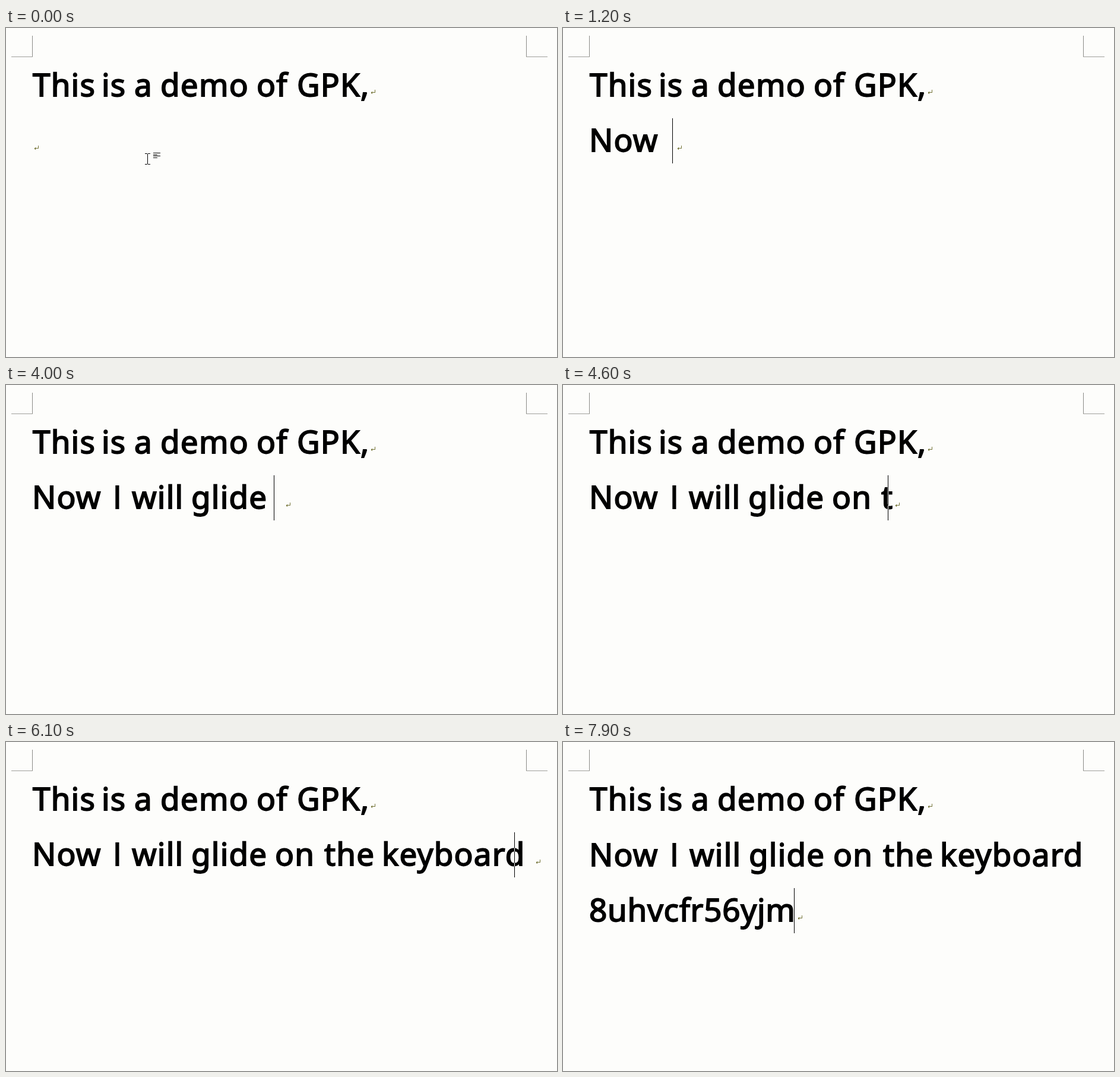
These frames come from a looping animation (928 px wide and 554 px high, 8 s). An HTML page:

```html
<!DOCTYPE html>
<html lang="en">
<head>
<meta charset="utf-8">
<title>Typing demo</title>
<style>
  html, body { margin: 0; width: 100%; height: 100%; overflow: hidden; background: #fdfdfb; }
  svg { display: block; width: 100%; height: 100%; background: #fdfdfb; }
  text {
    font: 400 53px "Noto Sans", sans-serif; letter-spacing: 1.2px; white-space: pre;
    fill: #000; stroke: #000; stroke-width: 1.8px;
  }
  .plain { font-family: "Open Sans", sans-serif; }
  .tight { letter-spacing: .7px; }
  path { fill: none; shape-rendering: crispEdges; }
  #caret { fill: #fdfdfb; mix-blend-mode: difference; }
</style>
</head>
<body>
<svg viewBox="0 0 928 554">
  <defs>
    <path id="mark" stroke="#77773c" d="M7.5 0V4.5H1M1.5 3.5V6M2.5 3V7"/>
  </defs>
  <path stroke="#8c8c88" d="M44.5 13V48M876.5 13V48"/>
  <path stroke="#a0a09c" d="M9 48.5H45M876 48.5H912"/>
  <g id="title"></g>
  <use href="#mark" x="614" y="104"/>
  <g id="typed"></g>
  <use id="endMark" href="#mark"/>
  <path id="pointer" stroke="#000" d="M234 211.5H238M239 211.5H243M238.5 212V229M234 229.5H238M239 229.5H243
    M248 210.5H260M248 213.5H255M248 215.5H260M248 218.5H255"/>
  <rect id="caret" width="1" height="76"/>
</svg>
<script>
const LOOP = 8000, STEP = 100, GLIDE = 75;
const LEFT = 44, SPACE = 14, SPACING = 1.2, TIGHT = 0.7;
const TITLE_X = [45, 161, 216, 260, 422, 490];
const LOOSE_X = [44, 180, 212, 312, 453, 536, 633];
const JUSTIFIED_X = [44, 180, 213, 313, 455, 539, 635];

// Each burst: start time, time between keys, keys ("<" is backspace).
const BURSTS = [
  [400, 200, "Now"], [1000, 100, "  "], [1500, 0, "<"], [1760, 40, "I  "],
  [2500, 30, "<wi"], [2850, 50, "ll"], [3260, 100, "  "],
  [3520, 50, "<glide"], [3800, 200, "  "], [4110, 70, "<on  "],
  [4460, 80, "<the  "], [4900, 100, "<ke"], [5300, 150, "yboard"], [6100, 50, "  "],
  [7000, 0, "8"], [7250, 40, "uhvcfr56yjm"]
];

const $ = id => document.getElementById(id);
const pen = document.createElement("canvas").getContext("2d");

function wordWidth(word, spacing) {
  pen.font = `400 53px ${word === "I" ? '"Open Sans"' : '"Noto Sans"'}, sans-serif`;
  return pen.measureText(word).width + spacing * word.length;
}

function wordsSvg(line, xs, y) {
  return line.split(" ").filter(Boolean).map((word, i) =>
    `<text x="${xs[i]}" y="${y}"${word === "I" ? ' class="plain"' : ""}>${word}</text>`).join("");
}

// Markup of the typed text and the position where it ends.
function layout(text) {
  const wrap = text.indexOf("8");
  if (wrap >= 0) {
    const tail = text.slice(wrap);
    return {
      svg: wordsSvg(text.slice(0, wrap), JUSTIFIED_X, 209) +
        `<text class="tight" x="${LEFT}" y="302">${tail}</text>`,
      x: LEFT + wordWidth(tail, TIGHT),
      y: 302
    };
  }
  const words = text.split(" ").filter(Boolean);
  const last = words.length - 1;
  const spaces = text.length - text.trimEnd().length;
  return {
    svg: wordsSvg(text, LOOSE_X, 208),
    x: last < 0 ? LEFT : LOOSE_X[last] + wordWidth(words[last], SPACING) + spaces * SPACE,
    y: 208
  };
}

const states = [{ time: 100, ...layout("") }];
let text = "";
for (const [start, gap, keys] of BURSTS) {
  [...keys].forEach((key, i) => {
    text = key === "<" ? text.slice(0, -1) : text + key;
    states.push({ time: start + i * gap, ...layout(text) });
  });
}

// The caret eases exponentially towards the end of the text after every key.
function caretAt(time) {
  let { x, y } = states[0];
  states.forEach((state, i) => {
    if (state.time > time) return;
    const until = Math.min(time, states[i + 1]?.time ?? LOOP);
    const rest = Math.exp((state.time - until) / GLIDE);
    x = state.x + (x - state.x) * rest;
    y = state.y + (y - state.y) * rest;
  });
  return { x, y };
}

function draw(time) {
  const state = states.findLast(s => s.time <= time) ?? states[0];
  const caret = caretAt(time);
  const idle = time - state.time;
  $("typed").innerHTML = state.svg;
  $("endMark").setAttribute("x", Math.round(state.x) + 3);
  $("endMark").setAttribute("y", state.y - 10);
  $("caret").setAttribute("x", Math.round(caret.x));
  $("caret").setAttribute("y", Math.round(caret.y) - 56);
  $("caret").setAttribute("opacity", time < 100 || idle >= 500 ? 0 : idle >= 450 ? 0.5 : 1);
  $("pointer").setAttribute("visibility", time < 400 ? "visible" : "hidden");
}

$("title").innerHTML = wordsSvg("This is a demo of GPK,", TITLE_X, 115);

const begin = performance.now();
function tick() {
  const time = (performance.now() - begin) % LOOP;
  draw(Math.floor(time / STEP) * STEP);
  requestAnimationFrame(tick);
}
tick();
</script>
</body>
</html>
```
